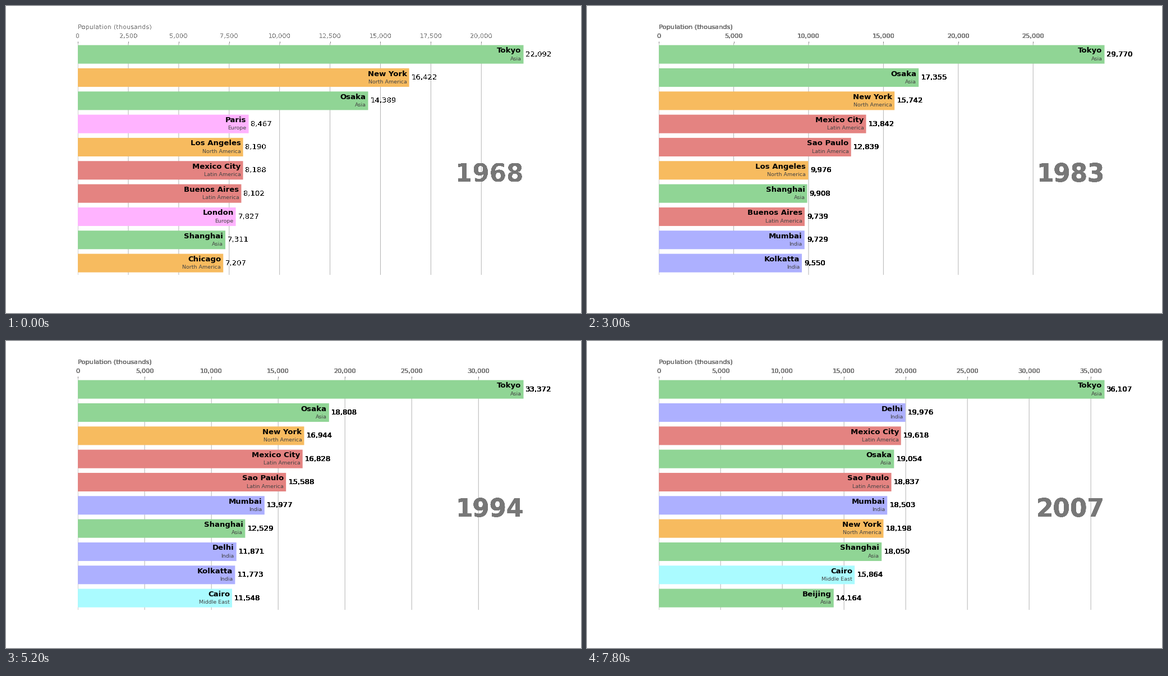
A matplotlib script that plays this animation: 1025x547 px, repeating every 8000 ms.

```python
import matplotlib.pyplot as plt
import numpy as np
from matplotlib.animation import FuncAnimation

W, H, DPI = 1025, 547, 64
PX = 72 / DPI                # one pixel in points
SCALE = W / 1080             # sizes below are pixels of a 1080 wide page
UNIT = SCALE * PX
FIRST, YEARS, ROWS = 1968, 40, 10
GREY = "#777777"

plt.rcParams["font.family"] = "DejaVu Sans"

COLORS = {
    "India": "#adb0ff",
    "Europe": "#ffb3ff",
    "Asia": "#90d595",
    "Latin America": "#e48381",
    "Middle East": "#aafbff",
    "North America": "#f7bb5f",
}

# Turning points of each city's growth (thousands); steady in between.
CITIES = {
    "Tokyo": ("Asia", {1968: 22092, 1975: 26615, 1990: 32530, 2007: 36107}),
    "New York": ("North America", {1968: 16422, 1973: 17161, 1980: 15601,
                                   1987: 15931, 2000: 17813, 2007: 18198}),
    "Osaka": ("Asia", {1968: 14389, 1975: 16298, 1995: 18940,
                       2001: 18680, 2007: 19054}),
    "Mexico City": ("Latin America", {1968: 8188, 1980: 13028,
                                      2000: 18457, 2007: 19618}),
    "Sao Paulo": ("Latin America", {1968: 6770, 1973: 8816,
                                    1980: 12089, 2007: 18837}),
    "Shanghai": ("Asia", {1968: 7311, 1975: 8001, 2000: 13959, 2007: 18050}),
    "Los Angeles": ("North America", {1968: 8190, 1973: 8840, 1995: 11339}),
    "Buenos Aires": ("Latin America", {1968: 8102, 1994: 10940}),
    "Paris": ("Europe", {1968: 8467, 1975: 9399, 1980: 8669}),
    "London": ("Europe", {1968: 7827, 1971: 7400}),
    "Chicago": ("North America", {1968: 7207, 1970: 7586, 1973: 7330}),
    "Rio de Janeiro": ("Latin America", {1970: 7350, 1980: 8784}),
    "Kolkatta": ("India", {1973: 7530, 2001: 13187, 2007: 13935}),
    "Mumbai": ("India", {1975: 7082, 1985: 10391, 2000: 16367, 2007: 18503}),
    "Delhi": ("India", {1985: 7325, 1994: 11871, 2007: 19976}),
    "Cairo": ("Middle East", {1985: 8328, 1994: 11548, 2007: 15864}),
    "Beijing": ("Asia", {2000: 10162, 2007: 14164}),
}


def ranking(year):
    """Largest cities of the year as (population, name, region)."""
    rows = []
    for name, (region, points) in CITIES.items():
        knots = list(points)
        if knots[0] <= year <= knots[-1]:
            value = np.interp(year, knots, list(points.values()))
            rows.append((value, name, region))
    return sorted(rows, reverse=True)[:ROWS]


fig = plt.figure(figsize=(W / DPI, H / DPI), dpi=DPI, facecolor="white")
ax = fig.add_axes([0.125, 0.125, 0.775, 0.755])


def label(x, y, text, size, **style):
    ax.text(x, y, text, size=size * UNIT, **style)


def ink(x, y, text, size, year, **style):
    """Hard-edged text: thin in the first year, heavy afterwards."""
    crisp = year == FIRST
    for _ in range(1 if crisp else 8):
        label(x, y, text, size, antialiased=not crisp, **style)


def draw_scale(top, year):
    step = 2500 if top <= 22500 else 5000
    ticks = np.arange(0, top, step)
    ax.set_xticks(ticks)
    ax.tick_params(axis="x", top=True, bottom=False, labelbottom=False,
                   color=GREY, length=3.5 * UNIT, width=UNIT)
    label_y = 1 + 7 * SCALE / (0.755 * H)
    for t in ticks:
        ax.axvline(t, color="#b0b0b0", linewidth=UNIT, snap=False, zorder=0)
        ink(t, label_y, f"{t:,.0f}", 12, year, color=GREY, ha="center",
            va="bottom", transform=ax.get_xaxis_transform())


def draw_bar(y, value, name, region, gap, year):
    ax.barh(y, value, color=COLORS[region], snap=False)
    label(value - gap, y, name, 14, weight=600, ha="right", va="bottom")
    label(value - gap, y - 0.25, region, 10, color="#444444",
          ha="right", va="baseline")
    ink(value + gap, y, f"{value:,.0f}", 14, year, ha="left", va="center")


def draw(frame):
    year = FIRST + frame
    rows = ranking(year)
    top = rows[0][0]

    ax.clear()
    ax.set_frame_on(False)
    draw_scale(top, year)
    for i, row in enumerate(rows):
        draw_bar(ROWS - 1 - i, *row, top / 200, year)
    ax.set_yticks([])
    ax.set_xlim(0, top)
    ax.set_ylim(-0.498, ROWS - 0.502)

    ink(1, 0.4, str(year), 46, year, color=GREY, weight=800, ha="right",
        transform=ax.transAxes)
    ink(0, 1.06, "Population (thousands)", 12, year, color=GREY,
        transform=ax.transAxes)
    return []


anim = FuncAnimation(fig, draw, frames=YEARS, interval=200,
                     init_func=lambda: [], repeat=True, repeat_delay=0)
plt.show()
```
